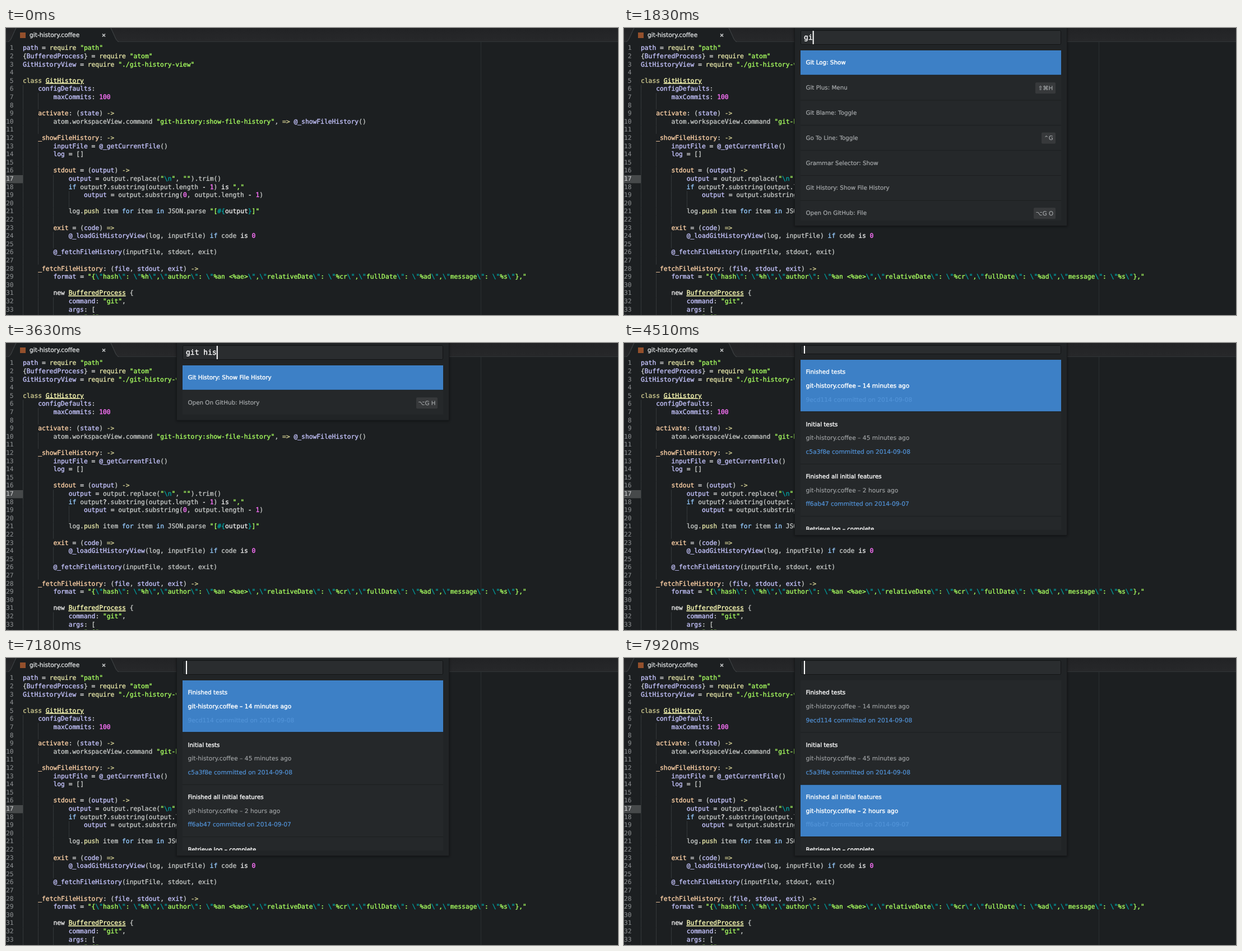
An HTML page for the animation above (8000 ms loop, 1092 px wide and 513 px high).

```html
<!DOCTYPE html>
<html lang="en">
<head>
<meta charset="utf-8">
<title>Git history in the editor</title>
<style>
  html, body { margin: 0; width: 100%; height: 100%; overflow: hidden; background: #1c1f21; }
  svg { display: block; width: 1092px; height: 513px; }
  text { white-space: pre; text-rendering: geometricPrecision; }
  .code { font: 11.31px "DejaVu Sans Mono", monospace; }
  .query { font: 13px "DejaVu Sans Mono", monospace; }
  .label { font: 10.32px "DejaVu Sans", sans-serif; }
  .note { font: 10.68px "DejaVu Sans", sans-serif; }
  .type { text-decoration: underline; }
</style>
</head>
<body>
<svg viewBox="0 0 1092 513">
  <defs>
    <linearGradient id="bar" x2="0" y2="1"><stop stop-color="#222325"/><stop offset="1" stop-color="#27282a"/></linearGradient>
    <filter id="soft" x="-5%" y="-5%" width="110%" height="110%"><feGaussianBlur stdDeviation="2"/></filter>
    <clipPath id="view"><rect id="viewBox" x="315" width="465"/></clipPath>
  </defs>
  <rect width="1092" height="513" fill="#1c1f21"/>
  <g id="editor"></g>
  <g id="panel"></g>
</svg>
<script>
const LOOP = 8000, CHAR = 6.81, LINE = 14.6, LEFT = 30, TOP = 28.7;

const source = String.raw`path = require "path"
{BufferedProcess} = require "atom"
GitHistoryView = require "./git-history-view"

class GitHistory
    configDefaults:
        maxCommits: 100

    activate: (state) ->
        atom.workspaceView.command "git-history:show-file-history", => @_showFileHistory()

    _showFileHistory: ->
        inputFile = @_getCurrentFile()
        log = []

        stdout = (output) ->
            output = output.replace("\n", "").trim()
            if output?.substring(output.length - 1) is ","
                output = output.substring(0, output.length - 1)

            log.push item for item in JSON.parse "[#{output}]"

        exit = (code) =>
            @_loadGitHistoryView(log, inputFile) if code is 0

        @_fetchFileHistory(inputFile, stdout, exit)

    _fetchFileHistory: (file, stdout, exit) ->
        format = "{\"hash\": \"%h\",\"author\": \"%an <%ae>\",\"relativeDate\": \"%cr\",\"fullDate\": \"%ad\",\"message\": \"%s\"},"

        new BufferedProcess {
            command: "git",
            args: [
                "-C",`.split("\n");

const colors = {
  plain: "#c5c8c6", string: "#a8ff60", escape: "#00a0a0", inner: "#ededed", type: "#ffffb6",
  store: "#cfcb90", key: "#96cbfe", word: "#ededed", support: "#e6e6a8", num: "#ff73fd",
  func: "#ffd2a7", vary: "#c6c5fe", op: "#ededed"
};
const grammar = new RegExp([
  /(?<string>"(?:\\.|[^"\\])*")/, /(?<type>(?<=class |new )\w+)/, /(?<store>\bclass\b|[-=]>)/,
  /(?<key>\b(?:if|for|in)\b)/, /(?<word>\b(?:is|new)\b)/, /(?<support>\b(?:require|push)\b)/,
  /(?<num>\b\d+\b)/, /(?<func>\b\w+(?=(?::| =) (?:\([^)]*\) )?[-=]>))/,
  /(?<vary>@\w+|\b\w+(?=:|}? =|[\w, ]*\) [-=]>))/, /(?<op>[=?\-])/
].map(r => r.source).join("|"), "g");
const stringParts = /(?<escape>\\.|#\{|(?<=#\{\w+)\})|(?<inner>(?<=#\{)\w+)/g;

const esc = s => s.replace(/&/g, "&amp;").replace(/</g, "&lt;");
const rect = (x, y, w, h, fill, more = "") =>
  `<rect x="${x}" y="${y}" width="${w}" height="${h}" fill="${fill}" ${more}/>`;
const text = (x, y, str, fill, cls, weight = .35, more = "") =>
  `<text x="${x}" y="${y}" class="${cls}" fill="${fill}" stroke="${fill}" stroke-width="${weight}" ${more}>${esc(str)}</text>`;

// Splits a string into [kind, text] pairs.
function tokens(str, rules, base) {
  const out = [];
  let last = 0;
  for (const m of str.matchAll(rules)) {
    if (m.index > last) out.push([base, str.slice(last, m.index)]);
    out.push([Object.keys(m.groups).find(k => m.groups[k] !== undefined), m[0]]);
    last = m.index + m[0].length;
  }
  if (last < str.length) out.push([base, str.slice(last)]);
  return out;
}

function codeLine(str, y) {
  let col = 0;
  return tokens(str, grammar, "plain")
    .flatMap(([kind, s]) => kind === "string" ? tokens(s, stringParts, kind) : [[kind, s]])
    .map(([kind, s]) => {
      const pad = s.length - s.trimStart().length;
      const x = LEFT + (col + pad) * CHAR;
      col += s.length;
      return s.trim() && text(x.toFixed(2), y, s.trim(), colors[kind], "code " + kind);
    }).join("");
}

const indentOf = s => s ? s.search(/\S/) / 4 : 0;

function drawEditor() {
  let out = rect(847, 25, 1, 488, "#2b2f31");
  out += rect(0, 263, 30, 14.4, "#46494a");
  source.forEach((str, i) => {
    const top = TOP + i * LINE, base = (top + 10.6).toFixed(2);
    const depth = str ? indentOf(str) : Math.max(indentOf(source[i - 1]), indentOf(source[i + 1]));
    for (let d = 0; d < depth; d++)
      out += rect(Math.round(LEFT + d * 4 * CHAR), top, 1, LINE, "#34383a");
    out += text(2 * CHAR, base, String(i + 1), i === 16 ? "#c8cacb" : "#85888a", "code", .15, 'text-anchor="end"');
    out += codeLine(str, base);
  });
  out += rect(0, 0, 1092, 24, "url(#bar)") + rect(0, 24, 1092, 1, "#303436");
  out += '<path d="M4 25C9 23 10 16 18 0H187C195 16 196 23 201 25Z" fill="#1c1f21"/>';
  out += '<path d="M4 24.5C9 23 10 16 18 0M187 0C195 16 196 23 201 24.5" fill="none" stroke="#45494b"/>';
  out += rect(25, 8, 10, 10, "#93502c");
  out += text(42, 16.3, "git-history.coffee", "#dcdedf", "note");
  out += '<path d="M172 10.5l5 5m0-5l-5 5" stroke="#c4c6c7" stroke-width="1.7"/>';
  document.getElementById("editor").innerHTML = out;
}

const show = ["Git History: Show File History"], hub = s => "Open On GitHub: " + s;
const lists = {
  all: [["Application: About"], ["Application: Bring All Windows To Front"], ["Application: Hide", "⌘H", 29],
    ["Application: Install Update"], ["Application: Minimize", "⌘M", 30], ["Application: New File", "⌘N", 29],
    ["Application: New Window", "⇧⌘N", 36]],
  gi: [["Git Log: Show"], ["Git Plus: Menu", "⇧⌘H", 36], ["Git Blame: Toggle"], ["Go To Line: Toggle", "⌃G", 25],
    ["Grammar Selector: Show"], show, [hub("File"), "⌥G O", 39]],
  git: [["Git Log: Show"], ["Git Plus: Menu", "⇧⌘H", 36], ["Git Blame: Toggle"], show,
    [hub("File"), "⌥G O", 39], [hub("Blame"), "⌥G B", 38], [hub("History"), "⌥G H", 38]],
  his: [show, [hub("History"), "⌥G H", 38]]
};
const commits = [
  ["Finished tests", "14 minutes ago", "9ecd114", "2014-09-08"],
  ["Initial tests", "45 minutes ago", "c5a3f8e", "2014-09-08"],
  ["Finished all initial features", "2 hours ago", "ff6ab47", "2014-09-07"],
  ["Retrieve log – complete", "3 hours ago", "b81d02c", "2014-09-07"]
];

// Start time, list, query, selected row, input height, start of the cursor blink
const scenes = [
  [0, null],
  [500, "all", "", 0, 15, 560],
  [650, "all", "", 0, 25, 560],
  [1680, "gi", "g", 0, 25, 2500],
  [1830, "gi", "gi", 0, 25, 2500],
  [1980, "git", "git", 0, 25, 2500],
  [2130, "git", "git ", 0, 25, 2500],
  [2280, "git", "git h", 0, 25, 3060],
  [2430, "his", "git hi", 0, 25, 3060],
  [2580, "his", "git his", 0, 25, 3060],
  [3920, null],
  [4510, "commits", "", 0, 15, 4930],
  [4660, "commits", "", 0, 25, 4930],
  [7320, "commits", "", 1, 25, 4930],
  [7620, "commits", "", 2, 25, 4930]
];

// Row background with the dark rule below it
const rowBox = (y, h, on) =>
  (on ? rect(315, y, 465, h, "#3d80c6") : "") + rect(315, y + h, 465, 1, "#1c1e20");

function commandRow([name, keys, w], y, on) {
  let out = rowBox(y, 43.8, on);
  out += text(324.5, y + 25.4, name, on ? "#fff" : "#a9acae", "label", on ? .4 : .2);
  if (keys) {
    out += rect(770 - w, y + 12.4, w, 20, "#37393b", 'rx="2"');
    out += text(770 - w / 2, y + 26, keys, "#a4a7a9", "label", .15, 'text-anchor="middle"');
  }
  return out;
}

function commitRow([title, ago, hash, date], y, on) {
  return rowBox(y, 92.4, on) +
    text(324.5, y + 25.4, title, "#fff", "label", .35) +
    text(324.5, y + 50, "git-history.coffee – " + ago, on ? "#fff" : "#a0a3a5", "note", on ? .4 : .15) +
    text(324.5, y + 74.5, `${hash} committed on ${date}`, "#5293d8", "note", .2);
}

const panel = document.getElementById("panel"), view = document.getElementById("viewBox");

function drawPanel([, list, query, row, inputH]) {
  if (!list) { panel.innerHTML = ""; return; }
  const isLog = list === "commits", items = isLog ? commits : lists[list];
  const pitch = isLog ? 93.4 : 44.8, y = inputH + 15;
  const h = Math.min(304, items.length * pitch - 1), bottom = y + h + 10;
  view.setAttribute("y", y);
  view.setAttribute("height", h);
  panel.innerHTML =
    rect(304, -10, 487, bottom + 11, "#000", 'opacity=".45" filter="url(#soft)"') +
    rect(304.5, -5, 486, bottom + 4.5, "#212426", 'stroke="#17191b"') +
    rect(315.5, 4.5, 464, inputH, "#2a2d2f", 'rx="2" stroke="#121415"') +
    text(321, 21.2, query, "#fff", "query", .4) +
    rect(315, y, 465, h, "#25282a") +
    `<g clip-path="url(#view)">${items.map((item, i) =>
      (isLog ? commitRow : commandRow)(item, y + i * pitch, i === row)).join("")}</g>` +
    rect(321 + query.length * 7.83, 5, 2, inputH - 1, "#fff", 'id="cursor"');
}

// The cursor fades out over 220 ms, waits, and fades back in; one blink takes 800 ms.
function cursorAlpha(t, start) {
  if (t < start) return 1;
  const p = (t - start) % 800;
  return p < 220 ? 1 - p / 220 : Math.min(1, Math.max(0, (p - 360) / 180));
}

const TICK = 148.5;
const snap = t => 500 + Math.floor((t - 492) / TICK) * TICK;

const begin = performance.now();
let current = null;

function frame() {
  const t = (performance.now() - begin) % LOOP;
  const scene = scenes.findLast(s => s[0] <= t);
  if (scene !== current) drawPanel(current = scene);
  if (scene[1]) document.getElementById("cursor").setAttribute("opacity", cursorAlpha(snap(t), scene[5]).toFixed(2));
  requestAnimationFrame(frame);
}

drawEditor();
frame();
</script>
</body>
</html>
```
